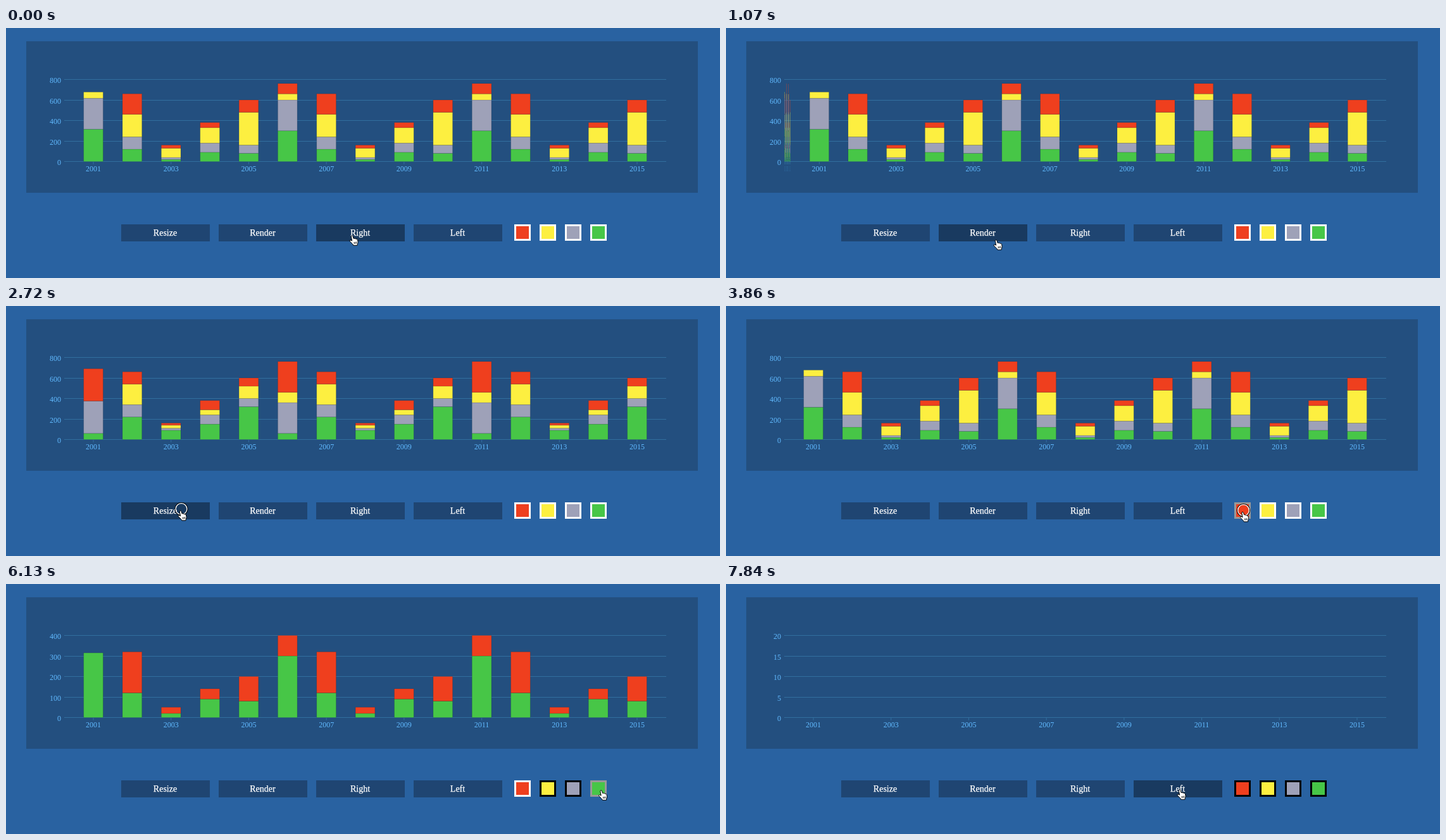
Write an HTML page that moves like this. It is 1128 px wide and 396 px high and loops after 8000 ms.

```html
<!DOCTYPE html>
<html lang="en">
<head>
<meta charset="utf-8">
<title>Stacked bar chart</title>
<style>
  html, body { margin: 0; width: 100%; height: 100%; overflow: hidden; background: #2962a1; }
  svg { display: block; font: 12px "Liberation Serif", "Times New Roman", serif; }
  .axis text { fill: #61baff; }
  .axis path { stroke: #326f9f; fill: none; }
  .bars rect { stroke: #000; stroke-opacity: .13; }
  .button { font-size: 14px; fill: #fff; stroke: #fff; stroke-width: .25; text-anchor: middle; }
</style>
</head>
<body>
<svg id="stage" width="1128" height="396" viewBox="0 0 1128 396"></svg>
<script>
const LOOP = 8000, LEFT = 92, RIGHT = 1043, BASE = 211.5, HEIGHT = 130;
const STEP = (RIGHT - LEFT) / 15.5;
const stage = document.getElementById('stage');

// Series order, bottom to top: green, gray, yellow, red
const COLORS = ['#47c647', '#9ea1b8', '#fdef40', '#ef3f1e'];
const CYCLE = [[300, 60, 100], [120, 220, 200], [20, 90, 30], [90, 150, 50], [80, 320, 120]];
const years = make => Array.from({ length: 15 }, (_, i) => make(...CYCLE[i % 5]));
const first = years((a, b, c) => [a, a, b, c]);
const second = years((a, b, c) => [b, a, c, a]);
first[0] = [315, 302, 60, 0];
second[0] = [60, 315, 0, 315];

const SLIDE = 243, RENDER = 1448, RESIZE = 2870, DURATION = 960;
const clicks = [[120, SLIDE], [1300, RENDER], [2720, RESIZE], [3830, 3980], [4580, 4730],
  [5110, 5230], [5780, 5930], [6490, 6630], [7320, 7470]];

// Pointer moves: start, end, x, y, downward sag
const moves = [[420, 1080, 428, 333, 6.5], [1720, 2540, 277, 321.5, 6], [3200, 3740, 817.5, 323.5, 0],
  [4850, 5030, 855.5, 324, 1], [5240, 5420, 900, 325, 0], [5950, 6130, 941.5, 324, 1],
  [6750, 7140, 817.5, 324, 1], [7600, 7840, 718, 323, 1]];

const clamp = v => Math.max(0, Math.min(1, v));
const cubic = p => p < .5 ? 4 * p ** 3 : 1 - 4 * (1 - p) ** 3;
const between = (t, a, b) => t >= a && t < b;

function pointerAt(t) {
  let x = 548, y = 326;
  for (const [start, end, toX, toY, sag] of moves) {
    if (t < start) break;
    const e = .5 - .5 * Math.cos(Math.PI * clamp((t - start) / (end - start)));
    x += (toX - x) * e;
    y += (toY - y) * e + sag * Math.sin(Math.PI * e);
  }
  return [x, y];
}

const shown = t => [t < 6630, t < 5930, t < 5230, !between(t, 3980, 4730) && t < 7470];
const axisMax = t => t < 5930 ? 800 : t < 6630 ? 400 : t < 7470 ? 200 : 20;

function grid(max) {
  let out = '';
  for (let i = 0; i < 5; i++) {
    const y = Math.floor(BASE - i * HEIGHT / 4) + .5;
    out += `<path d="M${LEFT} ${y}H${RIGHT}"/>
      <text x="87" y="${y + 5}" text-anchor="end">${max / 4 * i}</text>`;
  }
  return `<g class="axis">${out}</g>`;
}

// Bars and year labels, squeezed horizontally about one edge
function chart(data, on, max, grow, scale, edge) {
  if (scale <= 0) return '';
  let bars = '', labels = '';
  data.forEach((values, i) => {
    const x = LEFT + STEP * (i + .5);
    let y = BASE;
    values.forEach((value, k) => {
      const h = on[k] ? value / max * HEIGHT * grow : 0;
      if (!h) return;
      y -= h;
      bars += `<rect x="${x}" y="${y}" width="${STEP / 2}" height="${h}" fill="${COLORS[k]}"/>`;
    });
    if (i % 2 == 0) {
      const mid = x + STEP / 4;
      labels += `<path d="M${mid} 212v4"/>
        <text x="${mid}" y="227" text-anchor="middle">${2001 + i}</text>`;
    }
  });
  return `<g transform="translate(${edge * (1 - scale)}) scale(${scale} 1)">
    <g class="bars">${bars}</g><g class="axis">${labels}</g></g>`;
}

function controls(on, [px, py]) {
  const hit = (x, w, h) => px >= x && px < x + w && py >= 311 && py < 311 + h;
  let out = '';
  ['Resize', 'Render', 'Right', 'Left'].forEach((name, i) => {
    const x = 182 + 154 * i;
    out += `<rect x="${x}" y="311" width="140" height="27" fill="${hit(x, 140, 27) ? '#193a60' : '#1f4572'}"/>
      <text class="button" x="${x + 69.5}" y="329">${name}</text>`;
  });
  for (let i = 0; i < 4; i++) {
    const x = 803 + 40 * i, k = 3 - i;
    const border = hit(x, 26, 26) ? '#999' : on[k] ? '#fff' : '#000';
    out += `<rect x="${x + 1.5}" y="312.5" width="23" height="23" fill="${COLORS[k]}"
      stroke="${border}" stroke-width="3"/>`;
  }
  return out;
}

function pointer([x, y], pressed) {
  const ring = pressed ? `<g fill="none" stroke-width="1.3">
    <circle cx="${x}" cy="${y}" r="9.9" stroke="#000"/>
    <circle cx="${x}" cy="${y}" r="8.9" stroke="#fff"/></g>` : '';
  return ring + `<g transform="translate(${x - 6} ${y + 2})" stroke="#000" stroke-linejoin="round">
    <path fill="#fff" d="M3.4 2.6Q3.2 .9 4.5 .8Q5.7 .8 6.1 2.2L7 5.4Q8.2 4.6 9.1 5.8Q10.4 5.1 11.2 6.4
      Q12.8 5.8 13.4 7.4L14 10.2Q14.3 12 13.3 13.8L13 16.3H6.8Q6.4 14.8 5 13.6L1.2 9.8
      Q.5 8.4 1.9 8Q3 7.9 4.6 9.2Z"/>
    <path fill="none" stroke-width=".8" d="M7.9 11l.4 3M9.7 10.8l.3 3M11.5 10.6l.2 3"/></g>`;
}

function draw(t) {
  const on = shown(t), max = axisMax(t), at = pointerAt(t);
  const slide = cubic(clamp((t - SLIDE) / DURATION));
  const grow = t < RENDER ? 1 : cubic(clamp((t - RENDER) / DURATION));
  const data = between(t, RENDER, RESIZE) ? second : first;
  const pressed = clicks.some(([a, b]) => between(t, a, b));
  stage.innerHTML = '<rect x="32" y="21" width="1061" height="240" fill="#234f7f"/>'
    + grid(max)
    + chart(data, on, max, grow, 1 - slide, LEFT)
    + chart(data, on, max, grow, slide, RIGHT)
    + controls(on, at)
    + pointer(at, pressed);
}

const begin = performance.now();
function tick() {
  draw((performance.now() - begin) % LOOP);
  requestAnimationFrame(tick);
}
tick();
</script>
</body>
</html>
```
